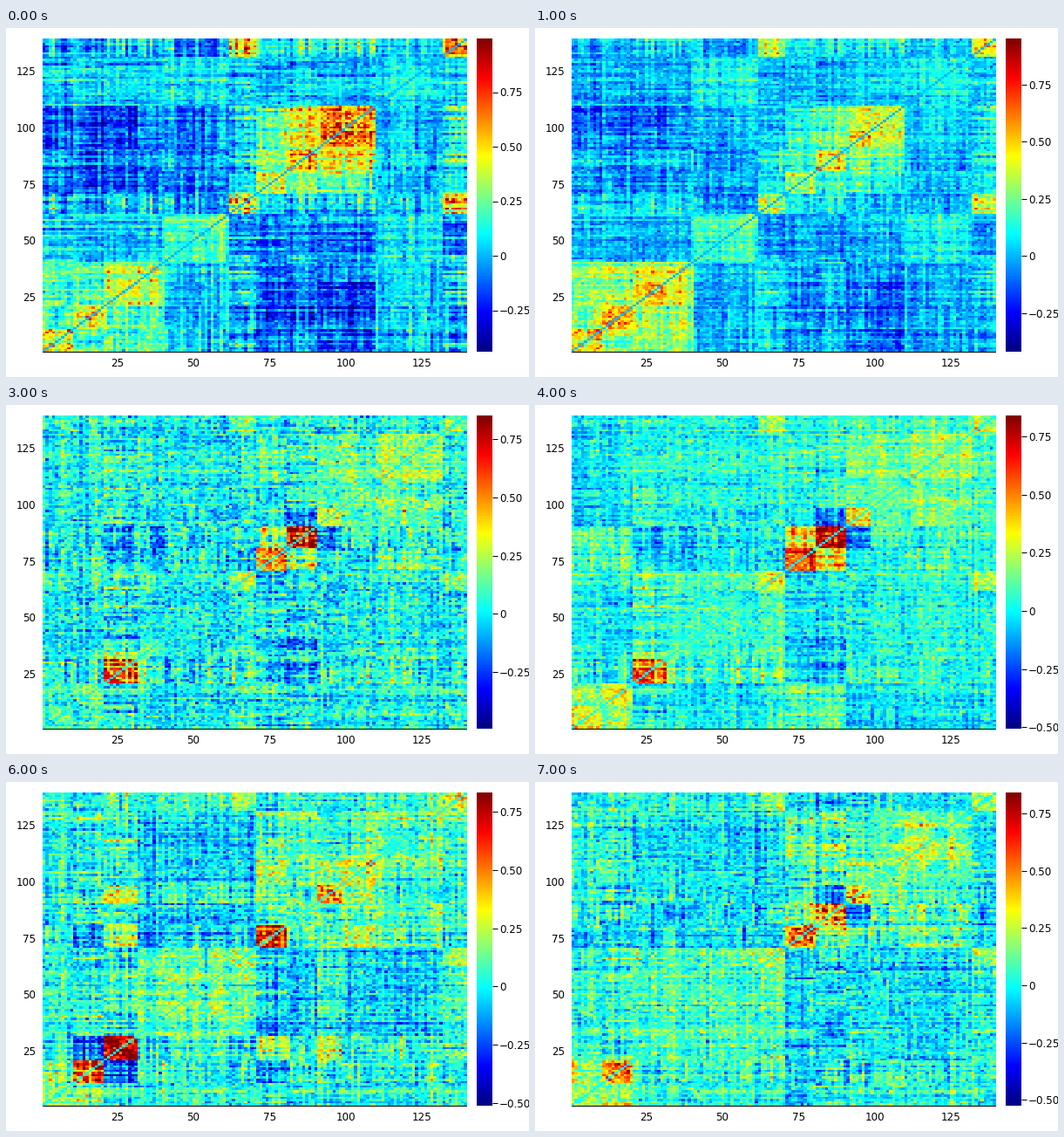
Animation of 600 by 400 pixels, one loop 8 s. Source, as a matplotlib script:

```python
import numpy as np
import matplotlib.pyplot as plt
from matplotlib.animation import FuncAnimation
from matplotlib.colors import LinearSegmentedColormap

W, H, DPI = 600, 400, 100
# Regions along the axis: capitals fill the left half, small letters the right
ENDS = dict(A=10, B=20, C=31, D=40, E=61, F=70,
            a=80, b=90, c=98, d=109, e=131, f=139)
N = ENDS["f"]
ZONES = np.searchsorted(list(ENDS.values()), np.arange(1, N + 1))
REGION = np.array(list(ENDS))[ZONES]
STEPS = np.arange(-2, 4) * 0.25

JET = LinearSegmentedColormap.from_list("rainbow", [
    (0, "#000080"), (0.125, "#0000ff"), (0.375, "#00ffff"),
    (0.625, "#ffff00"), (0.875, "#ff0000"), (1, "#800000")], N=256)

plt.rcParams["font.family"] = "DejaVu Sans"
plt.rcParams["font.size"] = 8.6


def mirror(a):
    return np.triu(a) + np.triu(a, 1).T


def loading(rng, group):
    """Weight of each node: near 1 before the dash, near -1 after, small elsewhere."""
    plus, _, minus = group.partition("-")
    sign = np.isin(REGION, list(plus)) * 1 - np.isin(REGION, list(minus))
    size = np.clip(rng.normal(0.95, 0.25, N), 0.2, 1.25)
    return np.where(sign, sign * size, rng.normal(0, 0.2, N))


def matrix(seed, noise, groups):
    """Symmetric correlations: groups of regions that rise and fall together."""
    rng = np.random.default_rng(seed)
    m = np.full((N, N), 0.03)
    for group, strength in groups.items():
        w = loading(rng, group)
        m += strength * np.outer(w, w)
    m *= mirror(rng.uniform(0.7, 1.3, (N, N)))
    bands = rng.normal(0, 0.035, (N, 1)) + rng.normal(0, 0.03, (N, len(ENDS)))[:, ZONES]
    m += bands + bands.T + mirror(rng.normal(0, noise, (N, N)))
    np.fill_diagonal(m, 0)
    return m


def between(a, b):
    return 0.55 * (a + b)


split = matrix(3, 0.055, {
    "Ff": 0.55, "A": 0.3, "B": 0.28, "CD": 0.2, "a": 0.26, "b": 0.25, "cd": 0.25,
    "bcd": 0.1, "abcd-ABCD": 0.19, "abcdFf-E": 0.11, "Ee": 0.07})
lower = matrix(8, 0.07, {
    "ABCD": 0.29, "A": 0.25, "B": 0.18, "C": 0.22, "ABCDFb-Ede": 0.1,
    "Ff": 0.1, "a": 0.22, "b": 0.1, "c": 0.22})
sparse = matrix(14, 0.085, {
    "C": 0.42, "CD-ab": 0.12, "a": 0.32, "b": 0.36, "b-c": 0.2, "cde": 0.11,
    "ae": 0.12, "Ff": 0.18, "AB": 0.1, "Ab": 0.07})
corners = matrix(21, 0.08, {
    "A": 0.15, "AB": 0.15, "Aab": 0.18, "C": 0.3, "CDEF-abB": 0.1, "Ff": 0.2,
    "a": 0.15, "ab": 0.15, "c-b": 0.24, "cdef-AB": 0.12})
islands = matrix(27, 0.08, {
    "B": 0.3, "AB": 0.15, "B-aC": 0.2, "C": 0.2, "Cc": 0.26, "cd": 0.12,
    "acd": 0.14, "a": 0.2, "Ff": 0.18, "DEF-abde": 0.1, "Cf-B": 0.08})
quiet = matrix(33, 0.075, {
    "B": 0.34, "AB": 0.1, "CDEF-abcde": 0.08, "AB-ab": 0.08, "Ff": 0.16,
    "a": 0.3, "b": 0.25, "c-b": 0.27, "cd": 0.08, "ae": 0.1, "f": 0.08})

# matrix, lower and upper colour limit, one per second
SCENES = [
    (split, -0.440, 0.996),
    (between(split, lower), -0.417, 0.950),
    (lower, -0.395, 0.914),
    (sparse, -0.493, 0.851),
    (between(sparse, corners), -0.506, 0.840),
    (corners, -0.565, 0.832),
    (islands, -0.511, 0.832),
    (quiet, -0.525, 0.841),
]


def pixel_axes(fig, x0, y0, x1, y1):
    return fig.add_axes([x0 / W, 1 - y1 / H, (x1 - x0) / W, (y1 - y0) / H])


def px(n):
    return n * 72 / DPI


def label(v):
    return "0" if v == 0 else f"{v:.2f}".replace("-", "\u2212")


fig = plt.figure(figsize=(W / DPI, H / DPI), dpi=DPI, facecolor="white")
ax = pixel_axes(fig, 42, 12, 528, 371)
bar = pixel_axes(fig, 540, 12, 558, 371)

heat = ax.imshow(split, cmap=JET, origin="lower", aspect="auto",
                 interpolation="nearest", extent=(0.5, N + 0.5, 0.5, N + 0.5),
                 zorder=5)
ax.set_xticks(range(25, 126, 25))
ax.set_yticks(range(25, 126, 25))
ax.tick_params(axis="x", length=0, pad=px(6.5))
ax.tick_params(axis="y", length=0, pad=px(7.5))
for side in ("top", "right"):
    ax.spines[side].set_visible(False)
for side in ("left", "bottom"):
    ax.spines[side].set_linewidth(px(1))

ramp = bar.imshow(np.linspace(0, 1, 256)[:, None], cmap=JET, origin="lower",
                  aspect="auto", interpolation="nearest")
bar.set_xticks([])
bar.yaxis.tick_right()
bar.tick_params(axis="y", length=px(6), width=px(1), pad=px(2))
for spine in bar.spines.values():
    spine.set_visible(False)


def draw(i):
    data, lo, hi = SCENES[i]
    heat.set_data(data)
    heat.set_clim(lo, hi)
    ramp.set_extent((0, 1, lo, hi))
    ticks = [v for v in STEPS if lo <= v <= hi]
    bar.set_yticks(ticks, [label(v) for v in ticks])
    bar.set_ylim(lo, hi)
    return heat, ramp


anim = FuncAnimation(fig, draw, frames=len(SCENES), interval=1000,
                     repeat=True, repeat_delay=0, blit=False)
plt.show()
```
